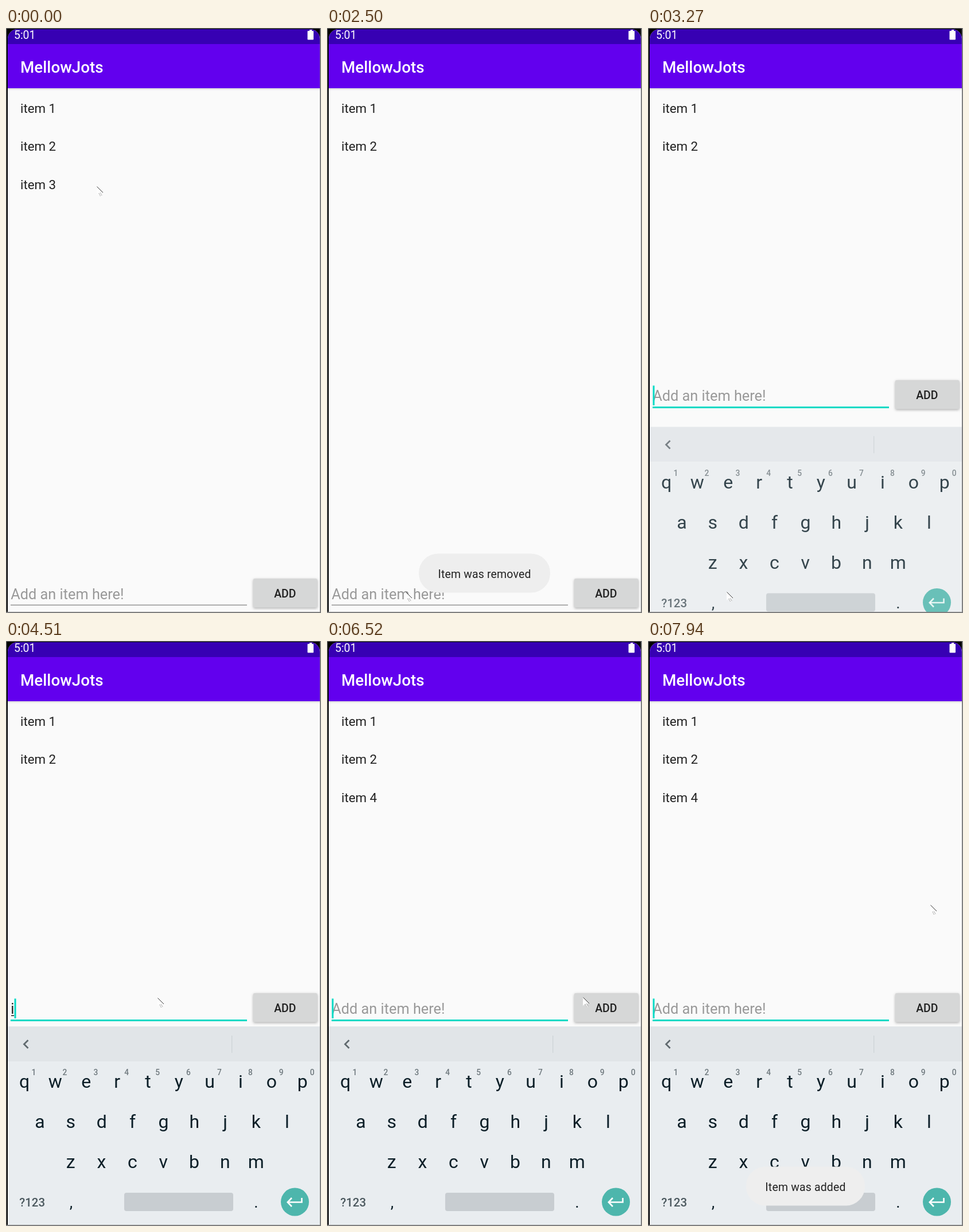
Write an HTML page with a canvas that moves like this. It is 549 px wide and 1020 px high and loops after 8000 ms.

```html
<!DOCTYPE html>
<html lang="en">
<head>
<meta charset="utf-8">
<title>To-do list</title>
<style>
  html, body { margin: 0; width: 100%; height: 100%; overflow: hidden; background: #7f7f7f; }
  canvas { display: block; width: 549px; height: 1020px; }
</style>
</head>
<body>
<canvas id="stage" width="549" height="1020"></canvas>
<script>
const ctx = document.getElementById('stage').getContext('2d');
const FONT = 'Roboto, "Noto Sans", sans-serif';
const TEAL = '#03dac5';
const INK = '#212121';
const KEY_INK = '#0b1e27';
const LIFT = 346; // keyboard height
const STEP = 130; // the screen refreshes in steps of this many ms
const LOOP = 8000;

// Moments of the story, in ms
const REMOVE = 590, FOCUS = 2980, OPEN = 3270, TYPE = 4510, TYPED = 5590, ADD = 6520;
const ENTRY = 'item 4';

// Pointer moves: start time, end time, place reached
const MOVES = [
  [700, 980, 169, 276],
  [1280, 1650, 327, 690],
  [1800, 2450, 137, 983],
  [3400, 3830, 264, 622],
  [5590, 6120, 446, 621],
  [7510, 7900, 492, 460]
];

// Stepped progress from 0 to 1
function ramp(t, from, to) {
  if (t <= from) return 0;
  if (t >= to) return 1;
  return Math.min(1, Math.floor((t - from) / STEP) * STEP / (to - from));
}

const smooth = p => p * p * (3 - 2 * p);

function entryText(t) {
  if (t < TYPE || t >= ADD) return '';
  const perKey = (TYPED - TYPE) / (ENTRY.length - 1);
  return ENTRY.slice(0, 1 + Math.floor((t - TYPE) / perKey));
}

function caretOn(t) {
  if (t < FOCUS) return false;
  if (t >= TYPE && t < TYPED) return true;
  const last = Math.max(...[FOCUS, TYPED, ADD].filter(m => m <= t));
  return (t - last) % 1000 < 500;
}

function text(str, x, y, size, color, weight = 400, align = 'left') {
  ctx.font = `${weight} ${size}px ${FONT}`;
  ctx.textAlign = align;
  ctx.fillStyle = color;
  ctx.fillText(str, x, y);
}

function rect(x, y, w, h, color) {
  ctx.fillStyle = color;
  ctx.fillRect(x, y, w, h);
}

function round(x, y, w, h, r, color) {
  ctx.beginPath();
  ctx.roundRect(x, y, w, h, r);
  ctx.fillStyle = color;
  ctx.fill();
}

function line(points, color, width) {
  ctx.beginPath();
  points.forEach(([x, y]) => ctx.lineTo(x, y));
  ctx.strokeStyle = color;
  ctx.lineWidth = width;
  ctx.stroke();
}

function drawBars() {
  const shade = ctx.createLinearGradient(0, 105, 0, 109);
  shade.addColorStop(0, 'rgba(0,0,0,.13)');
  shade.addColorStop(1, 'rgba(0,0,0,0)');
  rect(3, 105, 544, 4, shade);
  rect(3, 2, 544, 26, '#3700b3');
  rect(3, 28, 544, 77, '#6200ee');
  text('5:01', 14, 19, 19.4, '#fff');
  rect(529, 3, 4, 3, '#fff');
  round(525.5, 5, 10.5, 15.5, 1, '#fff');
  text('MellowJots', 25, 78, 27.76, '#fff', 500);
}

function drawItems(t) {
  const items = ['item 1', 'item 2'];
  if (t < REMOVE) items.push('item 3');
  if (t >= ADD) items.push(ENTRY);
  items.forEach((s, i) => text(s, 25, 147.8 + 66.6 * i, 22.3, INK));
}

function drawEntry(t) {
  const typed = entryText(t);
  ctx.save();
  ctx.translate(0, t >= OPEN ? -LIFT : 0);

  if (typed) text(typed, 8.3, 996, 25.3, INK);
  else text('Add an item here!', 8.3, 996, 25.3, '#999');
  const w = ctx.measureText(typed).width;
  if (typed && !typed.includes(' ')) rect(9, 998.5, w - 1, 1.5, INK);

  if (t >= FOCUS) rect(8, 1006, 412, 3, TEAL);
  else rect(8, 1005.5, 412, 1.3, '#868686');
  if (caretOn(t)) rect(8.4 + w, 969.5, 3, 34.5, TEAL);

  ctx.shadowColor = 'rgba(0,0,0,.3)';
  ctx.shadowBlur = 4;
  ctx.shadowOffsetY = 1.5;
  round(431, 960, 111.5, 50.5, 2.8, '#d6d7d7');
  ctx.shadowColor = 'transparent';
  text('ADD', 486.3, 993, 19.4, INK, 500, 'center');
  ctx.restore();
}

function drawKeyRow(keys, x, y) {
  [...keys].forEach((k, i) => text(k, x + 53.85 * i, y, 32, KEY_INK, 400, 'center'));
}

function drawKeyboard(t) {
  if (t < OPEN) return;
  const p = ramp(t, OPEN, OPEN + 3 * STEP);
  ctx.save();
  ctx.globalAlpha = 0.82 + 0.18 * p;
  ctx.translate(0, 23.5 * (1 - p) ** 2);
  rect(3, 672, 544, 61, '#e1e5e8');
  rect(3, 733, 544, 290, '#e9edf0');

  const suggest = entryText(t).length > 1 && t < TYPED + 2 * STEP;
  const [tip, back] = suggest ? [39, 32] : [31.5, 38.5];
  line([[back, 696], [tip, 703], [back, 710]], '#616a6f', 2.8);
  if (!suggest) rect(393, 688, 1.3, 30, '#ced3d6');

  drawKeyRow('qwertyuiop', 32, 779);
  drawKeyRow('asdfghjkl', 59, 849);
  drawKeyRow('zxcvbnm', 112.6, 919);
  [...'1234567890'].forEach((d, i) =>
    text(d, 48.5 + 53.9 * i, 757, 13.8, '#6f797e', 500, 'center'));
  text('?123', 45.7, 986, 20.4, '#4b585e', 500, 'center');
  text(',', 113.5, 988, 28, KEY_INK, 400, 'center');
  text('.', 436, 988, 28, KEY_INK, 400, 'center');
  round(206, 962, 190, 32, 4, '#c8cdd1');

  ctx.beginPath();
  ctx.arc(503.5, 978, 24.5, 0, Math.PI * 2);
  ctx.fillStyle = '#4db6ac';
  ctx.fill();
  line([[515.5, 971], [515.5, 978.5], [491, 978.5]], '#fff', 2.6);
  line([[498, 971], [490.8, 978.5], [498, 986]], '#fff', 2.6);
  ctx.restore();
}

function drawToast(str, alpha) {
  if (!alpha) return;
  ctx.save();
  ctx.globalAlpha = alpha;
  ctx.letterSpacing = '0.2px';
  ctx.font = `400 19.43px ${FONT}`;
  const w = ctx.measureText(str).width + 66.6;
  round(274.5 - w / 2, 916.5, w, 68, 33, '#eeeeee');
  text(str, 274.5, 958.5, 19.43, '#222', 400, 'center');
  ctx.restore();
}

function drawPointer(t) {
  let x = 158, y = 276;
  for (const [from, to, toX, toY] of MOVES) {
    const p = smooth(ramp(t, from, to));
    x += (toX - x) * p;
    y += (toY - y) * p;
  }
  ctx.save();
  ctx.translate(Math.round(x), Math.round(y));
  ctx.beginPath();
  [[0, 0], [0, 15], [3.5, 12], [6, 17.5], [9, 16.5], [6.5, 11.5], [11, 11]]
    .forEach(([px, py]) => ctx.lineTo(px, py));
  ctx.fillStyle = '#fdfdfd';
  ctx.fill();
  line([[0.5, 0.5], [11, 11]], '#222', 0.9);
  ctx.setLineDash([1, 1.2]);
  line([[4, 12], [6.5, 17]], '#555', 1);
  line([[6.5, 11.5], [9, 16]], '#555', 1);
  ctx.restore();
}

function draw(t) {
  rect(0, 0, 549, 1020, '#7f7f7f');
  rect(1, 1, 546, 1017, '#000');
  ctx.save();
  ctx.beginPath();
  ctx.roundRect(3, 2, 544, 1016, [17, 17, 0, 0]);
  ctx.clip();
  rect(3, 2, 544, 1016, '#fafafa');
  drawBars();
  drawItems(t);
  drawEntry(t);
  drawKeyboard(t);
  drawToast('Item was removed', ramp(t, REMOVE, REMOVE + 3 * STEP) - ramp(t, 2500, 2860));
  drawToast('Item was added', ramp(t, ADD, 7090));
  drawPointer(t);
  ctx.restore();
}

const start = performance.now();
function tick() {
  draw((performance.now() - start) % LOOP);
  requestAnimationFrame(tick);
}
tick();
</script>
</body>
</html>
```
